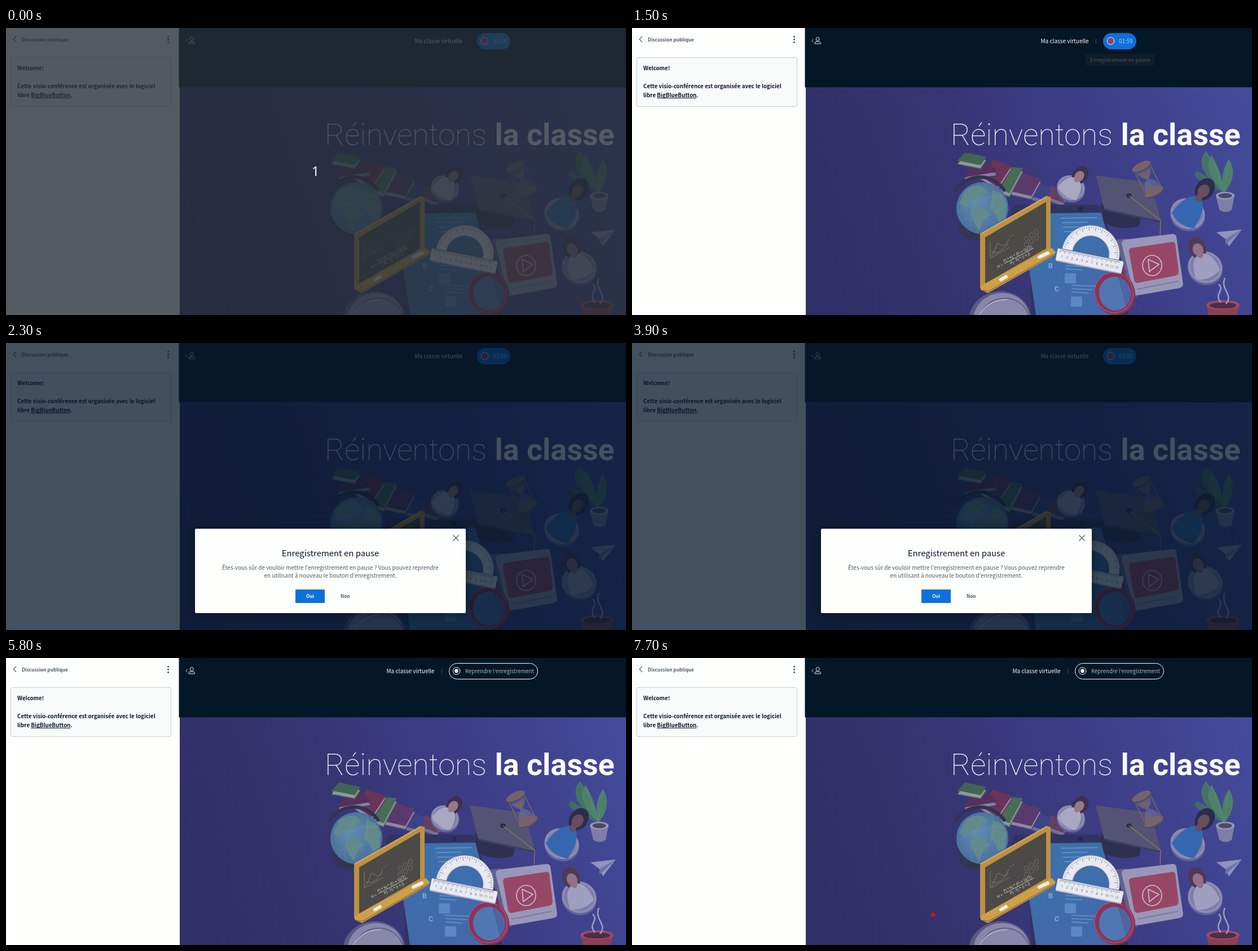
An HTML page with a canvas that plays this animation: 1099 by 510 pixels, repeating every 8 s.

```html
<!DOCTYPE html>
<html lang="fr">
<head>
<meta charset="utf-8">
<title>Ma classe virtuelle</title>
<style>
html, body { margin: 0; width: 100%; height: 100%; overflow: hidden; background: #fdfffd; }
canvas { display: block; width: 1099px; height: 510px; }
</style>
</head>
<body>
<canvas id="stage" width="1099" height="510"></canvas>
<script>
const W = 1099, H = 510, LOOP = 8000, TAU = Math.PI * 2;
const SANS = '"Noto Sans CJK JP", "Noto Sans CJK SC", "Noto Sans CJK", "Noto Sans", sans-serif';
const ROBOTO = 'Roboto, sans-serif';
const BLUE = '#0f70d7', WHITE = '#fdfffd', NAVY = '#041726';

const stage = document.getElementById('stage').getContext('2d');
let c = stage;

// ---- helpers ----
function paint(fill, stroke, width = 1) {
  if (fill) { c.fillStyle = fill; c.fill(); }
  if (stroke) { c.strokeStyle = stroke; c.lineWidth = width; c.stroke(); }
}
function trace(p) {
  c.beginPath();
  for (let i = 0; i < p.length; i += 2) c.lineTo(p[i], p[i + 1]);
}
function poly(fill, p, stroke, width) {
  trace(p);
  c.closePath();
  paint(fill, stroke, width);
}
function line(color, width, p) {
  trace(p);
  paint(null, color, width);
}
function oval(fill, x, y, rx, ry = rx, rot = 0, stroke, width) {
  c.beginPath();
  c.ellipse(x, y, rx, ry, rot, 0, TAU);
  paint(fill, stroke, width);
}
function box(fill, x, y, w, h, r = 0, stroke, width) {
  c.beginPath();
  c.roundRect(x, y, w, h, r);
  paint(fill, stroke, width);
}
function path(d, fill, stroke, width = 1) {
  const p = new Path2D(d);
  if (fill) { c.fillStyle = fill; c.fill(p); }
  if (stroke) { c.strokeStyle = stroke; c.lineWidth = width; c.stroke(p); }
}
function text(s, x, y, size, color, weight = 400, align = 'left', family = SANS) {
  c.font = `${weight} ${size}px ${family}`;
  c.textAlign = align;
  c.fillStyle = color;
  c.fillText(s, x, y);
}
function at(x, y, rot, draw) {
  c.save();
  c.translate(x, y);
  c.rotate(rot);
  draw();
  c.restore();
}
function layerOf(draw) {
  const layer = document.createElement('canvas'), before = c;
  layer.width = W;
  layer.height = H;
  c = layer.getContext('2d');
  draw();
  c = before;
  return layer;
}

// ---- slide artwork ----
function backdrop() {
  const g = c.createLinearGradient(330, 400, 1090, 140);
  g.addColorStop(0, '#312f67');
  g.addColorStop(0.3, '#353470');
  g.addColorStop(0.65, '#3c3d86');
  g.addColorStop(1, '#444b9a');
  c.fillStyle = g;
  c.fillRect(308, 105.5, W - 308, H - 105.5);
}

function book(cover, pages, p) {
  poly(pages, p.map((v, i) => i % 2 ? v + 6 : v));
  line(cover, 1.5, [p[6], p[7] + 6, p[4], p[5] + 6, p[2], p[3] + 6]);
  poly(cover, p);
  line('rgba(255,255,255,.2)', 1, p.slice(4, 8));
}
function books() {
  book('#3a4689', '#74759f', [712, 272, 746, 284, 736, 308, 698, 297]);
  book('#66415f', '#77779f', [742, 279, 773, 291, 764, 311, 737, 301]);
  book('#5e3a6c', '#9390ad', [686, 256, 725, 268, 708, 299, 664, 289]);
  book('#4a7252', '#959ea8', [670, 247, 693, 249, 669, 294, 650, 286]);
  book('#6f3454', '#9a90aa', [640, 234, 673, 245, 648, 283, 616, 262]);
  book('#5b2f5a', '#8c86a6', [600, 246, 635, 241, 648, 256, 588, 266]);
  book('#446a50', '#9aa2a7', [590, 221, 628, 229, 618, 244, 577, 236]);
}

function globe() {
  path('M578 345Q576 372 603 376Q635 379 652 364L640 350Z', '#343650');
  c.beginPath();
  c.arc(617, 316, 51, Math.PI * 1.17, Math.PI * 1.83);
  paint(null, '#303350', 6);
  const g = c.createRadialGradient(606, 303, 6, 621, 320, 47);
  g.addColorStop(0, '#6595b4');
  g.addColorStop(1, '#4c76a3');
  oval(g, 621, 320, 46);
  const land = '#67948f';
  path('M590 290Q604 277 620 281L630 291L618 297L612 309L600 306L591 317L580 312Z', land);
  path('M606 317L625 321L633 332L622 345L616 360L608 349L601 332Z', land);
  path('M639 288L655 294L664 311L662 337L650 344L644 330L634 319L637 304Z', land);
  oval(null, 621, 320, 46, 16, -0.3, 'rgba(190,225,235,.12)');
  oval(null, 621, 320, 16, 46, 0.3, 'rgba(190,225,235,.12)');
}

function bust(x, y, rx, ry, headX, headY, r, cloth, hair, skin) {
  oval('#68679a', x, y + 4, rx, ry, 0.35);
  oval('#9694b8', x, y, rx, ry, 0.35);
  oval('#8583ae', x, y, rx - 4, ry - 4, 0.35);
  const dx = headX - x, dy = headY - y, d = Math.hypot(dx, dy);
  at(x, y, Math.atan2(dy, dx) + Math.PI / 2, () => {
    oval(hair, 0, -d + 3, r * 0.95, r * 1.25);
    path(`M${-r * 1.4} ${r * 0.9}Q${-r * 1.4} ${-d * 0.4} ${-r * 0.4} ${-d * 0.6}H${r * 0.4}Q${r * 1.4} ${-d * 0.4} ${r * 1.4} ${r * 0.9}Q0 ${r * 1.6} ${-r * 1.4} ${r * 0.9}Z`, cloth);
    oval(skin, 0, -d * 0.62, r * 0.35, r * 0.45);
    oval(skin, 0, -d + r * 0.4, r * 0.58, r * 0.72);
  });
}

function tablet() {
  poly('#32335d', [674, 320, 680, 314, 826, 314, 836, 322, 880, 510, 708, 510, 705, 425, 672, 332]);
  const g = c.createLinearGradient(750, 328, 790, 510);
  g.addColorStop(0, '#3d77b1');
  g.addColorStop(1, '#426fb0');
  poly(g, [688, 330, 832, 328, 876, 496, 858, 510, 716, 510, 704, 428]);
  oval('#24274b', 795, 322, 4);
  const pale = 'rgba(125,176,220,.6)';
  for (let i = 0; i < 4; i++) line(pale, 2, [760 + i * 2, 338 + i * 8, 825 - (i % 2) * 18, 337 + i * 8]);
  for (const [s, x, y] of [['B', 742, 427], ['C', 753, 468]]) {
    text(s, x, y, 13, '#8bb7dc', 700, 'center', ROBOTO);
    box('rgba(110,165,216,.65)', x + 25, y + 9, 20, 18, 2);
    for (let i = 0; i < 3; i++) line(pale, 2, [x + 26, y - 11 + i * 6, x + 72 - i * 8, y - 9 + i * 6]);
  }
}

function board() {
  poly('#bd9140', [617, 366, 734, 299, 742, 300, 742, 393, 632, 470, 617, 462]);
  line('#d8b163', 2, [618, 366, 736, 299]);
  poly('#4b4a46', [626, 372, 734, 309, 734, 392, 626, 454]);
  poly('#cca04b', [619, 458, 744, 391, 751, 398, 748, 404, 631, 471, 618, 465]);
  line('#9a722d', 1.5, [622, 466, 632, 468, 748, 402]);
  c.lineCap = 'round';
  line('#f1eee8', 6, [654, 447, 663, 442]);
  line('#f1eee8', 6, [722, 407, 737, 400]);
  c.lineCap = 'butt';
  const chalk = 'rgba(235,235,225,.85)', faint = 'rgba(235,235,225,.4)';
  line(faint, 0.8, [635, 379, 635, 409, 669, 390]);
  path('M637 405C646 395 645 379 651 383S660 392 668 375M637 397Q650 405 667 382', null, faint, 0.8);
  for (let i = 0; i < 6; i++)
    oval(null, 699 + (i % 3) * 9, 374 + (i > 2) * 11 - (i % 3) * 6, 3.5, 4.2, 0, 'rgba(235,235,225,.3)', 0.8);
  at(682, 407, -0.49, () => {
    text('H =', -39, 2, 7, chalk, 400, 'left', ROBOTO);
    text('Pj * Kj * (Fi + Gj/2)', 4, -2, 7, chalk, 400, 'center', ROBOTO);
    text('Pj - Fj * (i + j)', 4, 7, 7, chalk, 400, 'center', ROBOTO);
    line(chalk, 0.8, [-25, 0, 34, 0]);
    text('C = x', 6, -36, 4, faint, 400, 'left', ROBOTO);
  });
}

function hourglass() {
  at(914, 268, -0.46, () => {
    path('M-13 -22Q-14 -7 -2 0Q-14 8 -14 23H14Q14 8 2 0Q14 -7 13 -22Z', 'rgba(120,122,160,.55)');
    path('M-9 -12Q-6 -4 0 0Q6 -4 9 -12Z', '#7d6560');
    path('M-12 22Q-4 5 12 22Z', '#7d6560');
    for (const x of [-15, 15]) line('#7c6857', 2, [x, -24, x, 24]);
    for (const y of [-25, 25]) {
      oval('#584b64', 0, y + 3, 18, 7);
      oval('#7a6768', 0, y, 18, 7);
    }
  });
}

function cap() {
  path('M831 312L836 345Q862 362 899 352L905 322Z', '#2e2f4c');
  poly('#3d3c5a', [822, 264, 838, 325, 938, 346, 937, 341]);
  poly('#575672', [822, 262, 919, 275, 938, 343, 837, 321]);
  oval('#282942', 881, 298, 5, 4);
  line('#a18048', 1.3, [881, 298, 937, 342, 936, 376]);
  path('M934 374H939L943 399Q936 405 930 399Z', '#a9853f');
}

function player() {
  poly('#66658f', [858, 376, 876, 374, 896, 478, 884, 475]);
  path('M868 384Q867 378 874 376L958 366Q964 366 965 371L977 455Q977 460 971 462L897 475Q890 475 889 470Z', '#a3a1bf');
  path('M885 391L958 380Q962 380 963 384L969 433Q969 438 964 440L896 453Q891 453 890 448L881 397Q881 392 885 391Z', '#a14863');
  oval(null, 922, 422, 17, 18, 0, '#ded1dd', 1.6);
  poly(null, [915, 411, 934, 420, 917, 433], '#ded1dd', 1.6);
  line('#83819f', 2, [896, 464, 968, 450]);
}

function protractor() {
  const ink = '#686879', body = '#e9e9f1';
  at(813, 402, 0.2, () => {
    c.beginPath();
    c.arc(0, 0, 42, Math.PI, TAU);
    paint(null, '#b0afc9', 19);
    c.beginPath();
    c.arc(0, 0, 42, Math.PI, TAU);
    paint(null, body, 17);
    for (let i = 1; i < 36; i++) {
      const a = Math.PI + i * Math.PI / 36, r = i % 3 ? 46 : 42;
      const x = Math.cos(a), y = Math.sin(a);
      line(ink, 0.7, [x * r, y * r, x * 49, y * 49]);
    }
    box('#b0afc9', -59, 3, 119, 21, 2);
    box(body, -59, 1, 119, 21, 2);
    for (let i = 0; i < 52; i++) line(ink, 0.6, [-54 + i * 2.1, 2, -54 + i * 2.1, i % 4 ? 5 : 8]);
    for (let i = 1; i <= 12; i++) text(i, -58 + i * 9, 16, 6, ink, 400, 'center', ROBOTO);
  });
}

function plant() {
  const leaf = (x, y, bx, by, color) => {
    path(`M1050 293Q${x - bx} ${y + by} ${x} ${y}Q${x + bx} ${y + by} 1050 293Z`, color);
    line('rgba(160,200,160,.2)', 0.8, [1050, 290, x, y]);
  };
  leaf(1017, 219, 25, 30, '#467963');
  leaf(1058, 233, 18, 28, '#4f8767');
  leaf(1002, 255, 20, 8, '#417164');
  leaf(1027, 226, 18, 27, '#508868');
  path('M1035 298L1041 323Q1052 331 1063 323L1068 298Z', '#8584a9');
  oval('#a2a0bc', 1051.5, 298, 16.5, 7);
  oval('#4d4967', 1051.5, 298, 12, 4.5);
}

function foreground() {
  oval('#5f5e87', 652, 518, 55, 50, -0.15);
  oval('#9291b1', 655, 518, 50, 47, -0.15);
  oval(null, 660, 523, 45, 43, -0.15, '#5a5982', 1.5);
  path('M616 510Q632 482 665 483', null, '#bbb9cb', 2);

  oval('rgba(98,136,190,.6)', 856, 472, 31, 33);
  oval(null, 856, 472, 32, 34, -0.25, '#943354', 8);
  oval(null, 854, 470, 34, 36, -0.25, '#b3587a', 1.5);
  path('M868 434L875 432L871 439L875 443L868 444', null, '#b62c3d', 2);

  path('M1018 491L1022 510H1072L1077 491Z', '#96404f');
  oval('#a84f60', 1047.5, 492, 29.5, 8);
  oval('#4d2c3e', 1047.5, 493, 24, 5.5);
  path('M1044 488C1030 471 1052 468 1040 455M1053 490C1067 474 1042 464 1051 444', null, '#aaa9c7', 2.5);
}

function objects() {
  books();
  globe();
  bust(778, 284, 25, 22, 796, 259, 14, '#b6b3c9', '#3d3049', '#a07f8a');
  tablet();
  cap();
  hourglass();
  player();
  plant();
  bust(985, 330, 31, 27, 1017, 284, 17, '#346cb4', '#292b47', '#6d5058');
  poly('#9a9cc3', [1036, 363, 1081, 358, 1058, 388, 1052, 375]);
  poly('#7478a8', [1052, 375, 1081, 358, 1052, 385]);
  bust(1016, 425, 31, 28, 1001, 388, 16, '#aba9c5', '#51384d', '#9a7787');
  foreground();
}

function slide() {
  backdrop();
  text('Réinventons', 565, 208, 53.8, '#f4f4fb', 100, 'left', ROBOTO);
  text('la classe', 866.5, 208, 53.8, '#fbfbfd', 700, 'left', ROBOTO);
  c.globalAlpha = 0.9;
  c.drawImage(layerOf(objects), 0, 0);
  c.globalAlpha = 1;
  board();
  protractor();
}

// ---- interface ----
function sidebar() {
  c.fillStyle = WHITE;
  c.fillRect(0, 0, 308, H);
  line('#4e5a66', 1.1, [18, 15, 13.2, 20, 18, 25]);
  text('Discussion publique', 28, 23.5, 8.3, '#4e5a66', 700);
  for (const y of [15.5, 20.5, 25.5]) oval('#33455a', 287.5, y, 1.4);
  box('#f9fbfa', 8.5, 52.5, 284, 87, 2, '#c5cbd1');
  const ink = '#06172a';
  text('Welcome!', 20, 75, 9.75, ink, 700);
  text('Cette visio-conférence est organisée avec le logiciel', 20, 107, 9.75, ink, 700);
  text('libre ', 20, 123, 9.75, ink, 700);
  const x = 20 + c.measureText('libre ').width;
  text('BigBlueButton', x, 123, 9.75, ink, 700);
  const w = c.measureText('BigBlueButton').width;
  c.fillRect(x, 124, w, 1);
  text('.', x + w, 123, 9.75, ink, 700);
}

function header() {
  c.fillStyle = NAVY;
  c.fillRect(306.5, 0, W, 105.5);
  line('#d5dbe0', 1, [321.5, 20, 318.8, 22.7, 321.5, 25.4]);
  oval(null, 329.2, 19.8, 3, 3.3, 0, '#e8ecef', 1);
  path('M324 28V26.6Q324 24.4 327 24.4H331.5Q334.5 24.4 334.5 26.6V28Z', null, '#e8ecef', 1);
}

function recorder(paused, clock) {
  const x = paused ? 785 : 835;
  text('Ma classe virtuelle', x - 110.5, 26.5, 10, '#ffffff');
  line('#3c4955', 1, [x - 12.5, 18.5, x - 12.5, 28]);
  if (paused) box(null, 785.5, 9.5, 157, 28, 14, '#fff');
  else box(BLUE, 835, 9, 59, 29, 14.5);
  oval(null, x + 13.5, 23, 6.3, 6.3, 0, '#fff', 1);
  oval(paused ? '#fff' : '#df2721', x + 13.5, 23, paused ? 3.4 : 4.3);
  const soft = 'rgba(255,255,255,.68)';
  if (paused) text("Reprendre l'enregistrement", 814, 26.5, 9.55, soft, 300);
  else text(clock, 863.3, 26.5, 9.7, soft, 300);
}

function tooltip(alpha) {
  c.globalAlpha = alpha;
  box('#333', 804, 46, 122, 21, 3);
  text('Enregistrement en pause', 865, 60, 9.2, '#fff', 400, 'center');
  c.globalAlpha = 1;
}

function dialog(t) {
  c.fillStyle = 'rgba(6,23,42,.75)';
  c.fillRect(0, 0, W, H);
  c.save();
  c.shadowColor = 'rgba(0,0,0,.5)';
  c.shadowBlur = 16;
  box(WHITE, 335, 330, 480, 150, 2);
  c.restore();
  line('#4e5a66', 1.2, [792.5, 341.5, 802.5, 351.5]);
  line('#4e5a66', 1.2, [802.5, 341.5, 792.5, 351.5]);
  text('Enregistrement en pause', 575, 379, 14.9, '#06172a', 400, 'center');
  text("Êtes-vous sûr de vouloir mettre l'enregistrement en pause ? Vous pouvez reprendre", 575, 402.5, 10, '#4e5a66', 400, 'center');
  text("en utilisant à nouveau le bouton d'enregistrement.", 575, 416.5, 10, '#4e5a66', 400, 'center');
  if (t >= 5000) {
    box(BLUE, 511, 436, 56, 28, 2);
    box(WHITE, 513, 438, 52, 24, 1);
    box(BLUE, 515, 440, 48, 20);
  } else {
    box(BLUE, 513, 438, 52, 24, 1);
  }
  const hover = t >= 3900 && t < 4200;
  text('Oui', 539, 452.5, 8.3, hover ? '#e4effa' : '#fff', 700, 'center');
  text('Non', 601.3, 452.5, 8.3, '#4e5a66', 700, 'center');
}

function countdown() {
  c.fillStyle = 'rgba(36,46,54,.78)';
  c.fillRect(0, 0, W, H);
  text('1', 548.5, 263, 23, '#fff', 400, 'center', '"Noto Sans", sans-serif');
}

function clockAt(t) {
  const s = 118 + Math.floor((t + 300) / 1000);
  return `0${Math.floor(s / 60)}:${String(s % 60).padStart(2, '0')}`;
}

// ---- animation ----
const scene = layerOf(() => {
  sidebar();
  header();
  slide();
});

function render(t) {
  c.drawImage(scene, 0, 0);
  recorder(t >= 5800, clockAt(t));
  if (t >= 1500 && t < 2200) tooltip(Math.min(1, (t - 1400) / 400));
  if (t >= 2300 && t < 5800) dialog(t);
  if (t >= 7500) {
    const moved = t >= 7700;
    oval('#c4161f', moved ? 533.5 : 534.5, moved ? 456 : 456.5, 4);
  }
  if (t < 100) countdown();
}

const start = performance.now();
function tick() {
  const t = (performance.now() - start) % LOOP;
  render(Math.floor(t / 100) * 100);
  requestAnimationFrame(tick);
}
tick();
</script>
</body>
</html>
```
